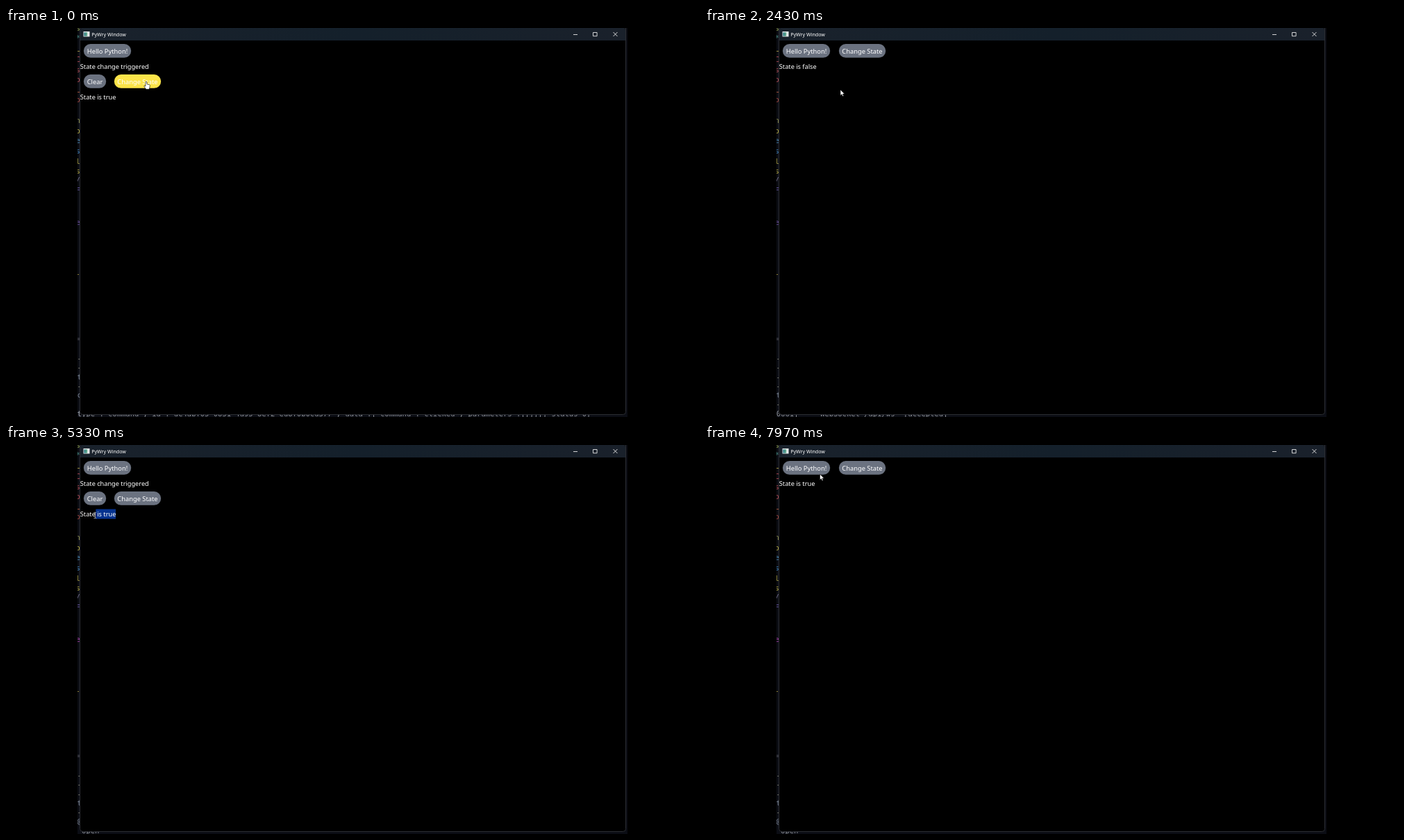
These frames come from a looping animation (998x561 px, 8 s). An HTML page:

```html
<!DOCTYPE html>
<html lang="en">
<head>
<meta charset="utf-8">
<title>PyWry Window</title>
<style>
  html, body { margin: 0; width: 100%; height: 100%; overflow: hidden; background: #000; }
  svg { display: block; width: 100%; height: 100%; }
  text { white-space: pre; }
  .ui { font: 9.2px "Noto Sans", sans-serif; fill: #fff; }
  .label { font-size: 9.3px; text-anchor: middle; }
  .code { font: 10.5px "DejaVu Sans Mono", monospace; }
  .pill { fill: #6b7280; }
</style>
</head>
<body>
<svg viewBox="0 0 998 561">
  <defs>
    <clipPath id="desktop"><rect x="103" width="792" height="561"/></clipPath>
    <linearGradient id="bar"><stop stop-color="#1a222c"/><stop offset=".5" stop-color="#14202b"/><stop offset="1" stop-color="#1a212b"/></linearGradient>
    <linearGradient id="icon"><stop stop-color="#317b8d"/><stop offset="1" stop-color="#69b18c"/></linearGradient>
  </defs>
  <rect width="998" height="561"/>
  <g clip-path="url(#desktop)">
    <rect x="103" width="792" height="561" fill="#0b0d14"/>
    <g id="editor" class="code"></g>
    <g id="terminal" class="code"></g>
  </g>

  <path d="M106.5 0H892.5V553.5a4 4 0 0 1-4 4H110.5a4 4 0 0 1-4-4Z" stroke="#2c2e33"/>
  <path d="M107 18V3q0-3 3-3H889q3 0 3 3V18Z" fill="url(#bar)"/>
  <rect x="111.5" y="5" width="9" height="7.5" fill="#e4e9ea"/>
  <rect x="112.3" y="6.3" width="4.8" height="5.4" fill="url(#icon)"/>
  <text class="ui" x="123.2" y="11.8" style="font-size:7.1px">PyWry Window</text>
  <path d="M817 9.5h6M845.5 6.5h5.6v5.2h-5.6ZM874.5 6l6 6m0-6l-6 6" fill="none" stroke="#e8e8e8" stroke-width=".9"/>

  <g id="page" class="ui">
    <g id="hello"></g>
    <g id="clear"></g>
    <g id="change"></g>
    <text id="message" x="106.8" y="58.9">State change triggered</text>
    <rect id="selection" x="107" y="92.5" width="51" height="14" fill="#06338f"/>
    <text id="state" x="106.8"></text>
  </g>

  <g id="cursor" stroke-linejoin="round">
    <path id="arrow" d="M0 0V8.4L1.9 6.6 3.2 9.5 4.6 8.9 3.3 6.1H5.9Z" fill="#fff" stroke="#000" stroke-width=".5"/>
    <path id="hand" d="M-1 1Q0-.7 1 1V4L4.6 4.8Q5.5 5 5.3 6.4L4.3 11.3H-.4L-3 7.3Q-3.4 6-2.2 6.1L-1 7.1Z" fill="#fff" stroke="#000" stroke-width=".6"/>
    <path id="beam" d="M-1.8-4.2h1.3l.5.4.5-.4h1.3M0-3.8V3.8M-1.8 4.2h1.3l.5-.4.5.4h1.3" fill="none" stroke="#ccc" stroke-width=".8"/>
  </g>
</svg>
<script>
const LOOP = 8000;
const $ = id => document.getElementById(id);
const show = (id, on) => $(id).setAttribute('visibility', on ? 'visible' : 'hidden');

function codeText(parent, x, y, fill, text) {
  const node = document.createElementNS('http://www.w3.org/2000/svg', 'text');
  for (const [key, value] of Object.entries({ x, y, fill })) node.setAttribute(key, value);
  node.textContent = text;
  parent.append(node);
  return node;
}

// Slivers of the editor beside the window: baseline, glyph, colour.
const editorGlyphs = [
  [4, 's', '#8b9a4a'], [18, '*', '#4b8f88'], [34, 'L', '#a99a45'], [49, 'C', '#b04a52'],
  [64, 's', '#b04a52'], [78, 'o', '#b04a52'], [93, 'L', '#b05a3c'], [107, 'o', '#a0453c'],
  [137, 'n', '#92934f'], [152, 'o', '#b3a83f'], [166, 'e', '#4a88b4'], [181, 's', '#3f82bb'],
  [196, 'l', '#aaa045'], [210, 's', '#b3a83f'], [223, '/', '#74708c'], [238, 'F', '#6c58a8'],
  [284, 'e', '#694b9a'], [358, '-', '#a8963c'], [452, '=', '#55555f']
].map(([y, glyph, fill]) => codeText($('editor'), 100.6, y, fill, glyph));
const caretGlyph = editorGlyphs[16];

const logs = [
  ['--t-c t', 'type":"command","id":"de4abf05-0851-4a95-8ef2-ed8f0b0cd377","data":{"command":"clicked","parameters":{}}}}} status=0}'],
  ['----t-', '0661]  - "WebSocket /api/ws" [accepted]'],
  ['---t-@', ' open']
];
let shownLog = -1;
function showLog(index) {
  if (index === shownLog) return;
  shownLog = index;
  $('terminal').replaceChildren();
  const [margin, lastLine] = logs[index];
  [...margin].forEach((glyph, i) =>
    codeText($('terminal'), 102.6, 480 + i * 13.25, glyph === '-' ? '#8c8b78' : '#818b9b', glyph));
  codeText($('terminal'), 102.8, 559.6, '#8d9096', lastLine);
}

function makeButton(id, label, width) {
  $(id).innerHTML = `<rect class="pill" width="${width}" height="19.8" rx="9.9"/>
    <text class="label" x="${width / 2}" y="13.8">${label}</text>`;
}
const place = (id, x, y) => $(id).setAttribute('transform', `translate(${x} ${y})`);
makeButton('hello', 'Hello Python!', 68.4);
makeButton('clear', 'Clear', 32.4);
makeButton('change', 'Change State', 67.4);
place('hello', 111.8, 23);
place('clear', 111.8, 67);

const within = (t, from, to) => t >= from && t < to;
const clamp = v => Math.max(0, Math.min(1, v));
const FADE = 200;

// Brightest of the hover periods, each fading in and out.
function hoverLevel(t, periods) {
  return Math.max(0, ...periods.map(([from, to]) =>
    Math.min(clamp((t - from) / FADE), clamp(1 - (t - to) / FADE))));
}
function paint(id, level) {
  const from = [107, 114, 128], to = [251, 228, 73];
  const rgb = from.map((c, i) => Math.round(c + (to[i] - c) * level));
  $(id).firstElementChild.style.fill = `rgb(${rgb})`;
}

// Time, tip position, and the pointer shape used from that time on.
const track = [
  [0, 202, 77, 'hand'], [150, 194, 77, 'hand'], [290, 153, 77, 'arrow'], [360, 138, 77, 'hand'],
  [480, 126, 76, 'hand'], [720, 124, 75, 'arrow'], [1150, 124, 75, 'arrow'], [1700, 152, 96, 'arrow'],
  [2250, 189, 93, 'arrow'], [2430, 195, 89, 'arrow'], [2750, 212, 60, 'arrow'], [2920, 219, 40, 'hand'],
  [3150, 222, 30, 'hand'], [3720, 222, 30, 'arrow'], [4000, 195, 62, 'arrow'], [4300, 148, 98, 'beam'],
  [4470, 139, 103, 'beam'], [4800, 158, 102, 'beam'], [5050, 158, 102, 'beam'], [5550, 108, 101, 'beam'],
  [5780, 112, 94, 'arrow'], [5960, 119, 83, 'hand'], [6100, 121, 79, 'hand'], [6440, 122, 77, 'arrow'],
  [6850, 145, 108, 'arrow'], [7300, 174, 98, 'arrow'], [7650, 176, 68, 'arrow'], [7970, 165.5, 42, 'arrow'],
  [8000, 165, 41, 'arrow']
];

function drawCursor(t) {
  const i = Math.max(0, track.findIndex(k => k[0] > t) - 1);
  const [t0, x0, y0, shape] = track[i], [t1, x1, y1] = track[i + 1];
  const u = (t - t0) / (t1 - t0), ease = u * u * (3 - 2 * u);
  place('cursor', x0 + (x1 - x0) * ease, y0 + (y1 - y0) * ease);
  for (const name of ['arrow', 'hand', 'beam']) show(name, name === shape);
}

const CLEARED = 600, RELOADED = 2390, CLICKED = 3530, CLEARED_AGAIN = 6400;

function draw(t) {
  const triggered = t < CLEARED || within(t, CLICKED, CLEARED_AGAIN);
  show('message', triggered);
  show('clear', triggered);
  place('change', triggered ? 155.8 : 192.8, triggered ? 67 : 23);
  $('state').textContent = `State is ${!within(t, RELOADED, CLICKED)}`;
  $('state').setAttribute('y', triggered ? 102.9 : 58.9);
  show('selection', within(t, 5500, CLEARED_AGAIN));
  const drag = clamp((t - 5050) / 500);
  if (within(t, 5050, 5500)) {
    show('selection', true);
    $('selection').setAttribute('x', 158 - 51 * drag);
    $('selection').setAttribute('width', 51 * drag);
  } else {
    $('selection').setAttribute('x', 107);
    $('selection').setAttribute('width', 51);
  }
  paint('clear', hoverLevel(t, [[350, CLEARED], [5955, CLEARED_AGAIN]]));
  paint('change', hoverLevel(t, [[-FADE, 200], [2900, 3720]]));
  showLog(t < RELOADED ? 0 : t < 2520 ? 1 : 2);
  caretGlyph.setAttribute('fill', t < 5060 ? '#694b9a' : '#a33fa5');
  drawCursor(t);
}

const start = performance.now();
function tick() {
  draw((performance.now() - start) % LOOP);
  requestAnimationFrame(tick);
}
tick();
</script>
</body>
</html>
```
